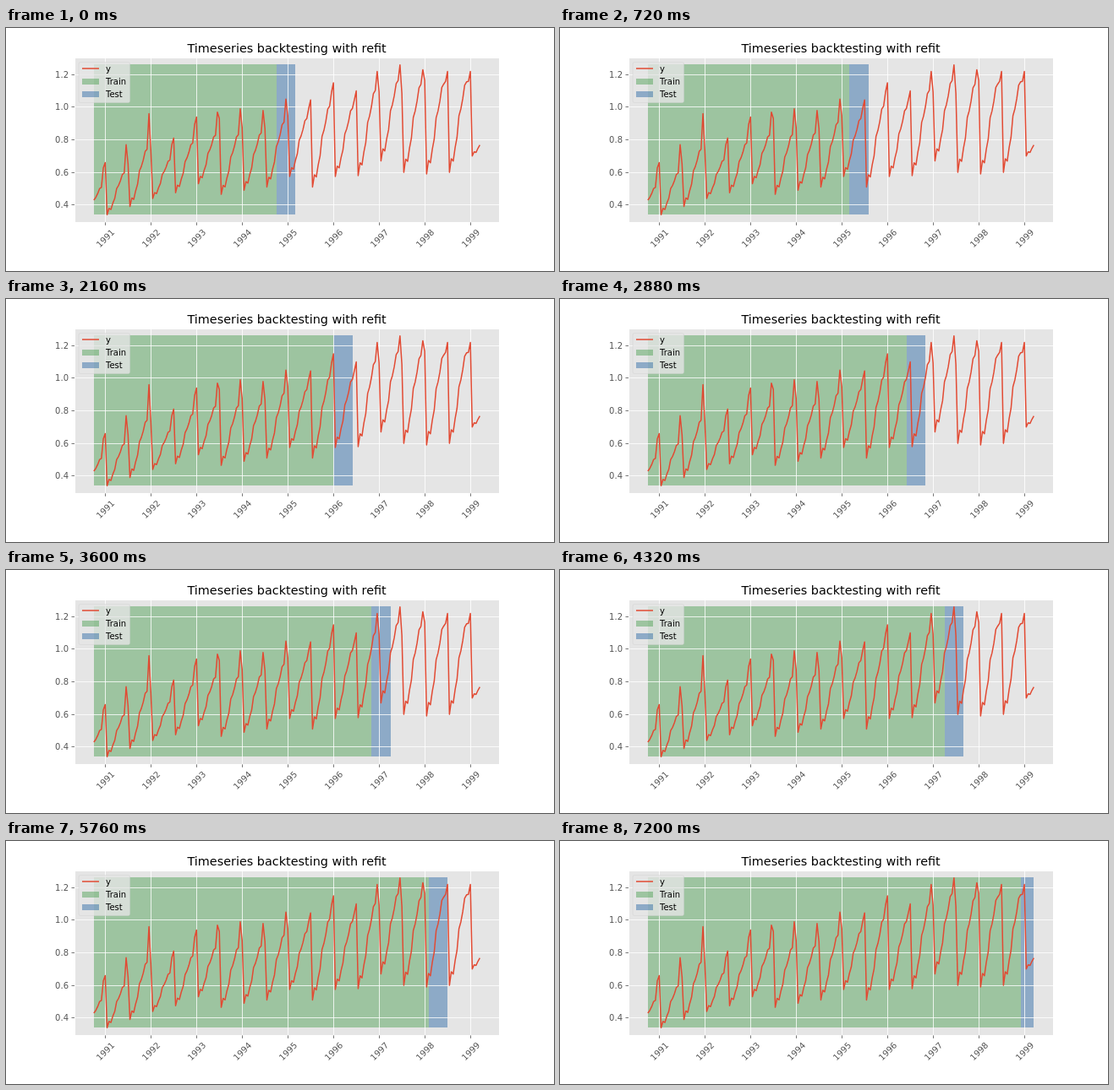
These frames come from a looping animation (648 by 288 pixels, 7920 ms). An HTML page:

```html
<!DOCTYPE html>
<html lang="en">
<head>
<meta charset="utf-8">
<title>Timeseries backtesting</title>
<style>
html, body { margin: 0; width: 100%; height: 100%; overflow: hidden; background: #fff; }
svg { display: block; width: 648px; height: 288px; }
text { font: 10px "DejaVu Sans", sans-serif; fill: #000; }
.title { font-size: 14.4px; text-anchor: middle; }
.tick { fill: #555; }
</style>
</head>
<body>
<svg id="chart" viewBox="0 0 648 288"></svg>
<script>
const STEP_MS = 720, STEPS = 11;
const FIRST_TEST = 96, TEST_SIZE = 10, LAST = 203;
const LINE = "#e24a33", TRAIN = "rgb(49,146,57)", TEST = "rgb(9,81,154)";

// Each season climbs from its low (month 0) to a peak in month 10 or 11.
const lows = [.30, .34, .39, .44, .475, .53, .465, .49, .51, .575, .51, .575, .58, .67, .6, .59, .6, .7];
const peaks = [.66, .77, .96, .81, .94, .97, .99, .98, 1.05, 1.045, 1.15, 1.1, 1.22, 1.26, 1.23, 1.22, 1.22, .89];
const climb = [0, .12, .1, .22, .31, .5, .56, .65, .77, .8];
const FIRST_MONTH = 5;

const chart = document.getElementById("chart");
const xOf = month => 103.83 + month * 456.5 / LAST;
const yOf = value => 209.65 - (value - 0.4) * 193;
const pixelCentre = v => Math.floor(v) + 0.5;

function seriesValue(index) {
  const month = (index + FIRST_MONTH) % 12;
  const season = Math.floor((index + FIRST_MONTH) / 12);
  const low = lows[season], peak = peaks[season];
  if (month < 10) {
    return low + (peak - low) * climb[month] * (0.72 + 0.025 * season);
  }
  const trend = 0.706 + 0.036 * season + 0.09 * Math.cos(Math.PI * (season - 4) / 3);
  if (month === 11) return Math.min(peak, trend);
  return trend < peak ? peak : 0.95 * peak;
}

function add(tag, attrs, text) {
  const el = document.createElementNS("http://www.w3.org/2000/svg", tag);
  for (const key in attrs) el.setAttribute(key, attrs[key]);
  if (text) el.textContent = text;
  return chart.appendChild(el);
}
const rect = (x, y, width, height, fill, more) =>
  add("rect", { x, y, width, height, fill, ...more });
const stroke = (d, color, width) =>
  add("path", { d, stroke: color, "stroke-width": width, fill: "none", "stroke-linejoin": "round" });
const label = (x, y, text, more) => add("text", { x, y, ...more }, text);
const band = fill => rect(104, 43, 0, 178, fill, { "fill-opacity": 0.4 });

function drawAxes() {
  for (let i = 0; i < 9; i++) {
    const x = pixelCentre(xOf(6 + 24 * i));
    stroke(`M${x} 36V230`, "#fff", 0.8);
    stroke(`M${x} 230.4v3.5`, "#555", 0.8);
    label(x, 252.8, String(1991 + i),
      { class: "tick", "text-anchor": "middle", transform: `rotate(-45 ${x} 249.2)` });
  }
  for (let i = 0; i < 5; i++) {
    const value = 0.4 + 0.2 * i, y = pixelCentre(yOf(value));
    stroke(`M82 ${y}H583`, "#fff", 0.8);
    stroke(`M77.5 ${y}H81`, "#555", 0.8);
    label(74, y + 3.6, value.toFixed(1), { class: "tick", "text-anchor": "end" });
  }
  label(332.1, 29, "Timeseries backtesting with refit", { class: "title" });
}

function drawSeries() {
  const points = Array.from({ length: LAST + 1 }, (_, i) =>
    `${xOf(i).toFixed(2)} ${yOf(seriesValue(i)).toFixed(2)}`);
  stroke("M" + points.join("L"), LINE, 1.5);
}

function drawLegend() {
  rect(86, 40.5, 60.5, 48, "#e5e5e5",
    { rx: 2, "fill-opacity": 0.8, stroke: "#ccc", "stroke-opacity": 0.8, "stroke-width": 0.5 });
  stroke("M90 48H110", LINE, 1.5);
  rect(90, 60, 20, 7, TRAIN, { "fill-opacity": 0.4 });
  rect(90, 75, 20, 7, TEST, { "fill-opacity": 0.4 });
  ["y", "Train", "Test"].forEach((name, i) => label(118, 52.4 + 14.8 * i, name));
}

rect(82, 36, 501, 194, "#e5e5e5");
const train = band(TRAIN), test = band(TEST);
drawAxes();
drawSeries();
drawLegend();

function setSpan(el, from, to) {
  el.setAttribute("x", from);
  el.setAttribute("width", to - from);
}

function update(ms) {
  const step = Math.floor(ms / STEP_MS) % STEPS;
  const start = FIRST_TEST + TEST_SIZE * step;
  const split = Math.round(xOf(start));
  const end = Math.round(xOf(Math.min(start + TEST_SIZE, LAST)));
  setSpan(train, 104, split);
  setSpan(test, split, end);
}

const begin = performance.now();
function frame() {
  update(performance.now() - begin);
  requestAnimationFrame(frame);
}
frame();
</script>
</body>
</html>
```
